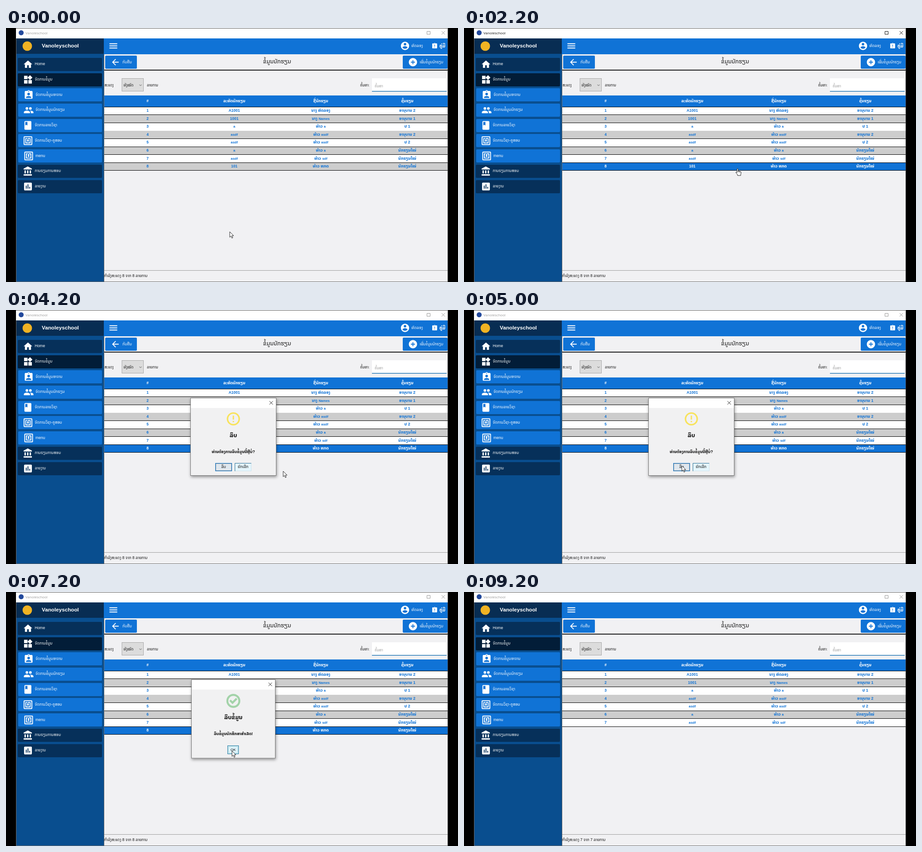
Write an HTML page that moves like this. It is 998x561 px and loops after 9400 ms.

```html
<!DOCTYPE html>
<html lang="lo">
<head>
<meta charset="utf-8">
<title>Vanoleschool</title>
<style>
html, body { margin: 0; width: 100%; height: 100%; overflow: hidden; background: #000; }
svg { display: block; width: 998px; height: 561px; }
text { font-family: "Liberation Sans", "Noto Sans Lao", "DejaVu Sans", sans-serif; white-space: pre; }
</style>
</head>
<body>
<svg id="stage" viewBox="0 0 998 561" xmlns="http://www.w3.org/2000/svg"></svg>
<script>
const LOOP = 9400, STEP = 200;
const BLUE = '#1073d6', INK = '#111', EDGE = '#6b6b6b';

// Icon outlines on a 24 unit grid
const board = 'M19 3h-4.2a3 3 0 0 0-5.6 0H5a2 2 0 0 0-2 2v14a2 2 0 0 0 2 2h14a2 2 0 0 0 2-2V5a2 2 0 0 0-2-2zM12 3a1 1 0 0 1 0 2a1 1 0 0 1 0-2z';
const disc = 'M12 2a10 10 0 0 0 0 20a10 10 0 0 0 0-20z';
const ICONS = {
  home: 'M10 20v-6h4v6h5v-8h3L12 3 2 12h3v8z',
  widgets: 'M13 13h8v8h-8zM3 13h8v8H3zM3 3h8v8H3zM16.7 1.7l5.6 5.6-5.6 5.7L11 7.3z',
  person: board + 'M12 7a3 3 0 0 1 0 6a3 3 0 0 1 0-6zM18 19H6v-1.4c0-2 4-3.1 6-3.1s6 1.1 6 3.1z',
  people: 'M16 5a3 3 0 0 1 0 6a3 3 0 0 1 0-6zM8 5a3 3 0 0 1 0 6a3 3 0 0 1 0-6zM8 13c-2.3 0-7 1.2-7 3.5V19h14v-2.5c0-2.3-4.7-3.5-7-3.5zM16 13l-1 .1c1.2.8 2 1.9 2 3.4V19h6v-2.5c0-2.3-4.7-3.5-7-3.5z',
  book: 'M18 2H6a2 2 0 0 0-2 2v16a2 2 0 0 0 2 2h12a2 2 0 0 0 2-2V4a2 2 0 0 0-2-2zM6 4h5v8l-2.5-1.5L6 12z',
  tag: 'M20 2H4a2 2 0 0 0-2 2v16a2 2 0 0 0 2 2h16a2 2 0 0 0 2-2V4a2 2 0 0 0-2-2zM20 20H4V4h16zM18 6h-5a2 2 0 0 0-2 2v2.3a2 2 0 1 0 2 0V8h3v8H8V8h2V6H6v12h12z',
  bank: 'M4 10h3v7H4zM10 10h3v7h-3zM16 10h3v7h-3zM2 19h19v3H2zM11.5 1L2 6v2h19V6z',
  chart: 'M19 3H5a2 2 0 0 0-2 2v14a2 2 0 0 0 2 2h14a2 2 0 0 0 2-2V5a2 2 0 0 0-2-2zM7 10h2v7H7zM11 7h2v10h-2zM15 13h2v4h-2z',
  user: disc + 'M12 5a3 3 0 0 1 0 6a3 3 0 0 1 0-6zM12 19.2a7 7 0 0 1-6-3.2c0-2 4-3.1 6-3.1s6 1.1 6 3.1a7 7 0 0 1-6 3.2z',
  manual: board + 'M11 8h2v6h-2zM11 16h2v2h-2z',
  plus: disc + 'M17 13h-4v4h-2v-4H7v-2h4V7h2v4h4z',
  back: 'M20 11H7.8l5.6-5.6L12 4l-8 8 8 8 1.4-1.4L7.8 13H20z',
  bars: 'M3 6h18v2H3zM3 11h18v2H3zM3 16h18v2H3z',
  find: 'M20 19.6V8l-6-6H6a2 2 0 0 0-2 2v16a2 2 0 0 0 2 2h12l1.2-.4-4.4-4.4a5 5 0 1 1 1.4-1.4zM12 10a3 3 0 0 0 0 6a3 3 0 0 0 0-6z',
  pen: 'M17.7 7L14 3.2l-10 10V17h3.7zM20.7 4a1 1 0 0 0 0-1.4L18.4.3a1 1 0 0 0-1.4 0L15 2.2 18.7 6zM0 20h24v4H0z',
  bin: 'M6 19a2 2 0 0 0 2 2h8a2 2 0 0 0 2-2V7H6zM19 4h-3.5l-1-1h-5l-1 1H5v2h14z',
  warn: disc + 'M12 4.3a7.7 7.7 0 0 1 0 15.4a7.7 7.7 0 0 1 0-15.4zM11 7h2v6h-2zM11 15h2v2h-2z',
  done: disc + 'M12 4.8a7.2 7.2 0 0 1 0 14.4a7.2 7.2 0 0 1 0-14.4zM6.3 12.2l2-2 2.5 2.5 5-5 2 2-7 7z'
};

const rect = (x, y, w, h, fill, more = '') =>
  `<rect x="${x}" y="${y}" width="${w}" height="${h}" fill="${fill}" ${more}/>`;
const text = (x, y, s, size, fill = INK, more = '') =>
  `<text x="${x}" y="${y + 3}" font-size="${size}" fill="${fill}" ${more}>${s}</text>`;
const mid = 'text-anchor="middle"', bold = 'font-weight="700"', midBold = mid + ' ' + bold;
const icon = (name, cx, cy, size, fill = '#fff') =>
  `<path d="${ICONS[name]}" fill="${fill}" fill-rule="evenodd" transform="translate(${cx - size / 2} ${cy - size / 2}) scale(${size / 24})"/>`;
const line = (d, stroke, width = 1, more = '') =>
  `<path d="${d}" fill="none" stroke="${stroke}" stroke-width="${width}" ${more}/>`;
const cross = (x, y, r) => `M${x - r} ${y - r}l${2 * r} ${2 * r}m0 ${-2 * r}l${-2 * r} ${2 * r}`;
const group = (id, body, more = '') => `<g id="${id}" ${more}>${body}</g>`;

// Icon, label, icon centre, dark fill
const MENU = [
  ['home', 'Home', 48.5, '#06305a'],
  ['widgets', 'ຈັດການຂໍ້ມູນ', 48.5, '#021d38'],
  ['person', 'ຈັດການຂໍ້ມູນອາຈານ', 50],
  ['people', 'ຈັດການຂໍ້ມູນນັກຮຽນ', 50],
  ['book', 'ຈັດການລາຍວິຊາ', 48.3],
  ['tag', 'ຈັດການວິຊາ-ຄູສອນ', 48.5],
  ['tag', 'menu', 50],
  ['bank', 'ການຮຽນການສອນ', 48.5, '#06305a'],
  ['chart', 'ລາຍງານ', 48.5, '#06305a']
];
const COLS = [312.5, 504, 695, 886];
const HEADS = ['#', 'ລະຫັດນັກຮຽນ', 'ຊື່ນັກຮຽນ', 'ຊັ້ນຮຽນ'];
const ROWS = [
  ['A1001', 'ນາງ ທົດລອງ', 'ອານຸບານ 2'],
  ['1001', 'ນາງ Names', 'ອານຸບານ 1'],
  ['a', 'ທ້າວ a', 'ປ 1'],
  ['asdf', 'ທ້າວ asdf', 'ອານຸບານ 2'],
  ['asdf', 'ທ້າວ asdf', 'ປ 2'],
  ['a', 'ທ້າວ a', 'ນັກຮຽນໃໝ່'],
  ['asdf', 'ທ້າວ sdf', 'ນັກຮຽນໃໝ່'],
  ['101', 'ທ້າວ ຫກດ', 'ນັກຮຽນໃໝ່']
];
const rowTop = i => Math.floor(175.2 + 17.57 * i);

function sidebar() {
  const items = MENU.map(([name, label, cx, dark], i) => {
    const y = 80.3 + 33.72 * i, x = dark ? 26 : 27;
    return rect(x, Math.round(y - 14.5), 212 - x, 29, dark || BLUE, 'rx="2"') +
      icon(name, cx, y, 23) + text(cx + 15, y - 1, label, 8.5, '#fff');
  });
  return rect(23, 23, 193, 537, '#094e8f') + rect(23, 23, 193, 34, '#082d53') +
    '<circle cx="47" cy="40" r="10.5" fill="#f0b323"/>' +
    text(79, 39.5, 'Vanoleyschool', 11.7, '#fff', bold) + items.join('');
}

function header() {
  return rect(216, 23, 759, 35, BLUE) + icon('bars', 237, 39.5, 23) +
    icon('user', 881, 39.5, 22) + text(895, 39, 'ທົດລອງ', 8.5, '#fff') +
    icon('manual', 946.5, 39.5, 14.5) + text(957, 39.5, 'ຄູ່ມື', 10.5, '#fff', bold) +
    rect(219, 61, 70, 29, BLUE, 'rx="2"') + icon('back', 241.5, 75.5, 22) + text(257, 74.5, 'ກັບຄືນ', 8.5, '#fff') +
    text(598.5, 74.5, 'ຂໍ້ມູນນັກຮຽນ', 12.7, INK, mid) +
    rect(876, 61, 99, 29, BLUE, 'rx="2"') + icon('plus', 898.5, 75.5, 22) + text(913.5, 74.5, 'ເພີ່ມຂໍ້ມູນນັກຮຽນ', 8, '#fff') +
    rect(216, 92, 759, 2, '#1b1b1b');
}

function filters() {
  return text(217.5, 125.5, 'ສະແດງ', 8) +
    rect(256, 111.5, 47.5, 28, '#dcdcdc', 'stroke="#a8a8a8"') + text(259.5, 125.5, 'ທັງໝົດ', 8) +
    line('M294.5 125l2.5 2.5 2.5-2.5', '#555') + text(311, 125.5, 'ລາຍການ', 8) +
    text(782, 125.5, 'ຄົ້ນຫາ:', 8) + rect(808, 111, 165, 28, '#fff') +
    rect(808, 139, 165, 1.5, '#2479b5') + text(814, 127.5, 'ຄົ້ນຫາ', 8, '#9a9a9a');
}

function table() {
  const small = s => String(s).replace(/[A-Z]?[a-z]+/g, '<tspan font-size="7.5">$&</tspan>');
  const cells = (vals, y, fill) => vals.map((v, i) =>
    text(COLS[i], y, small(v), /[ກ-ໝ]/.test(v) ? 9 : 8.5, fill, midBold)).join('');
  const rows = ROWS.map((row, i) => {
    const y = rowTop(i), end = rowTop(i + 1), last = i === ROWS.length - 1;
    return group('row' + (i + 1),
      rect(216, y, 759, end - y, i % 2 ? '#cdcdcd' : '#fff', last ? 'id="lastFill"' : '') +
      (i === 2 ? '' : rect(216, end - 1, 759, 1, '#000')) +
      cells([i + 1, ...row], 182.2 + 17.57 * i, BLUE));
  });
  return rect(216, 149, 759, 25, BLUE) + cells(HEADS, 160.5, '#fff') +
    rect(216, 174, 759, 1, '#000') + rows.join('');
}

function popup() {
  const items = [['find', 'ສະແດງ', '#1976d2'], ['pen', 'ແກ້ໄຂ', '#2e9b45'], ['bin', 'ລຶບ', '#f04438']];
  return rect(571.5, 308.5, 104, 62, '#000', 'opacity=".18"') +
    rect(569.5, 306.5, 104, 61, '#fdfdfd', 'stroke="#9a9a9a"') +
    rect(570, 327, 103, 19, '#91c9f7', 'id="hover"') +
    items.map(([name, label, c], i) =>
      icon(name, 583.5, 317.5 + 19.5 * i, 13.5, c) + text(600, 317 + 19.5 * i, label, 8.5)).join('');
}

function dialog(x, y, w, h, name, color, head, note) {
  return rect(x, y, w, h, '#f1f1f2', 'stroke="#777" filter="url(#shade)"') +
    rect(x + .5, y + .5, w - 1, 21.5, '#fff') + line(cross(x + w - 11, y + 10.5, 3.8), '#222') +
    icon(name, 502, 240.5, name === 'warn' ? 35 : 37, color) +
    text(502, 278, head, 13, INK, midBold) + text(502, 312.5, note, 9, INK, midBold);
}

const button = (x, y, w, h, label, fill, edge, size = 8.5) =>
  rect(x + .5, y + .5, w - 1, h - 1, fill, `stroke="${edge}"`) + text(x + w / 2, y + h / 2 - 1, label, size, INK, mid);
const dots = (x, y, w, h, c) => rect(x, y, w, h, 'none', `stroke="${c}" stroke-dasharray="1 1" stroke-width=".8"`);

const askBox = dialog(407.5, 194.5, 189, 171, 'warn', '#f8e35c', 'ລຶບ', 'ທ່ານຕ້ອງການລຶບຂໍ້ມູນນີ້ຫຼືບໍ່?') +
  button(462, 338, 37, 18, 'ລຶບ', '#dfe7ee', '#1177c8') + dots(463.5, 339.5, 34, 15, '#234') +
  button(505, 338, 37, 18, 'ຍົກເລີກ', '#e4f5fc', '#cfe4ee') + line('M505.5 356v-17.5h36', '#2b6e94');
const doneBox = dialog(409.5, 193.5, 185, 173.5, 'done', '#a3d3a9', 'ລຶບຂໍ້ມູນ', 'ລຶບຂໍ້ມູນນັກສຶກສາສຳເລັດ!') +
  button(489, 339, 25, 19, 'OK', '#dff3fb', '#15749c', 8) + dots(491.5, 341.5, 20, 14, '#5aa');

const arrow = '<path d="M0 0v12.2l2.8-2.7 2 4.6 2-.9-2-4.4h3.9z" fill="#fff" stroke="#111" stroke-width=".9"/>';
const hand = '<path d="M-1.2 1.2q1.2-2 2.4 0V6l5.2 1.2q1.6.5 1.5 2l-.9 4.3v2.3H0v-1.8L-3.6 9.5q-.5-1.7 1-1.5l1.4 1.5z" fill="#fff" stroke="#111" stroke-width=".9"/>' +
  line('M1.2 6v2.5M3.7 6.7V9M5.8 7.3V9', '#111', .7);

const stage = document.getElementById('stage');
stage.innerHTML =
  '<defs><clipPath id="app"><rect x="22" width="953.5" height="561"/></clipPath>' +
  '<filter id="shade" x="-10%" y="-10%" width="120%" height="125%"><feDropShadow dx="1" dy="3" stdDeviation="3" flood-opacity=".4"/></filter></defs>' +
  rect(0, 0, 998, 561, '#000') +
  '<g clip-path="url(#app)">' + rect(22, 0, 953.5, 561, '#f1f1f3') + rect(22, 0, 953.5, 23, '#fff') +
  rect(22, 0, 953.5, 1, '#555') + '<circle cx="33.5" cy="10.5" r="5.5" fill="#23499c"/>' +
  group('caption', '<text x="43" y="14" font-size="7.9" style="font-family:\'Open Sans\',sans-serif">Vanoleschool</text>' +
    line('M929.5 7.5h7v6.5h-7z' + cross(965.5, 10.7, 3.7), 'currentColor')) +
  sidebar() + header() + filters() + table() +
  rect(216, 535, 759, 1, '#9d9d9d') + rect(216, 58, 1, 502, EDGE) +
  rect(22, 23, 1, 538, EDGE) + rect(22, 560, 953, 1, EDGE) +
  `<text id="total" x="216.5" y="550" font-size="8.5" fill="${INK}"></text>` +
  group('popup', popup()) + group('ask', askBox) + group('done', doneBox) +
  group('cursor', group('arrow', arrow) + group('hand', hand)) + '</g>';

const $ = id => document.getElementById(id);
const show = (id, on) => $(id).setAttribute('display', on ? 'inline' : 'none');
const within = (t, a, b) => t >= a && t < b;

// Pointer stops: time, x, y
const PATH = [
  [0, 494, 450], [200, 494, 450], [800, 441, 457], [1000, 441, 457], [2000, 604, 310], [2200, 604, 310],
  [2600, 569, 306], [2800, 569, 306], [3600, 622, 344], [4000, 612, 356], [4200, 612, 356],
  [4800, 481, 344], [5200, 481, 344], [5800, 488, 347], [6400, 488, 347], [7000, 499, 351],
  [7600, 499, 351], [8800, 620, 575], [LOOP, 620, 575]
];
function pointer(t) {
  const i = PATH.findIndex(p => p[0] > t), [t0, x0, y0] = PATH[i - 1], [t1, x1, y1] = PATH[i];
  const u = (t - t0) / (t1 - t0), e = u * u * (3 - 2 * u);
  return [x0 + (x1 - x0) * e, y0 + (y1 - y0) * e];
}

function draw(t) {
  const [x, y] = pointer(t);
  const active = within(t, 1000, 4200) || within(t, 7600, 8800);
  const popupOn = within(t, 2800, 4200), picked = t >= 2000, removed = t >= 7800;
  const handOn = within(t, 2000, 4200);
  const tone = active ? '#111' : '#999';
  $('caption').setAttribute('fill', tone);
  $('caption').setAttribute('color', tone);

  show('row8', !removed);
  $('lastFill').setAttribute('fill', picked ? BLUE : '#cdcdcd');
  document.querySelectorAll('#row8 text').forEach(n => n.setAttribute('fill', picked ? '#fff' : BLUE));
  const n = removed ? 7 : 8;
  $('total').textContent = `ກຳລັງສະແດງ ${n} ຈາກ ${n} ລາຍການ`;

  const item = Math.floor((y - 307) / 19.5);
  show('popup', popupOn);
  show('hover', item >= 0 && item < 3);
  $('hover').setAttribute('y', 307.5 + 19.5 * item);
  show('ask', within(t, 4200, 5400));
  show('done', within(t, 6200, 7400));

  show('hand', handOn);
  show('arrow', !handOn);
  $('cursor').setAttribute('transform', `translate(${x} ${y})`);
}

function tick(now) {
  draw(Math.floor((now % LOOP) / STEP) * STEP);
  requestAnimationFrame(tick);
}
draw(0);
requestAnimationFrame(tick);
</script>
</body>
</html>
```
